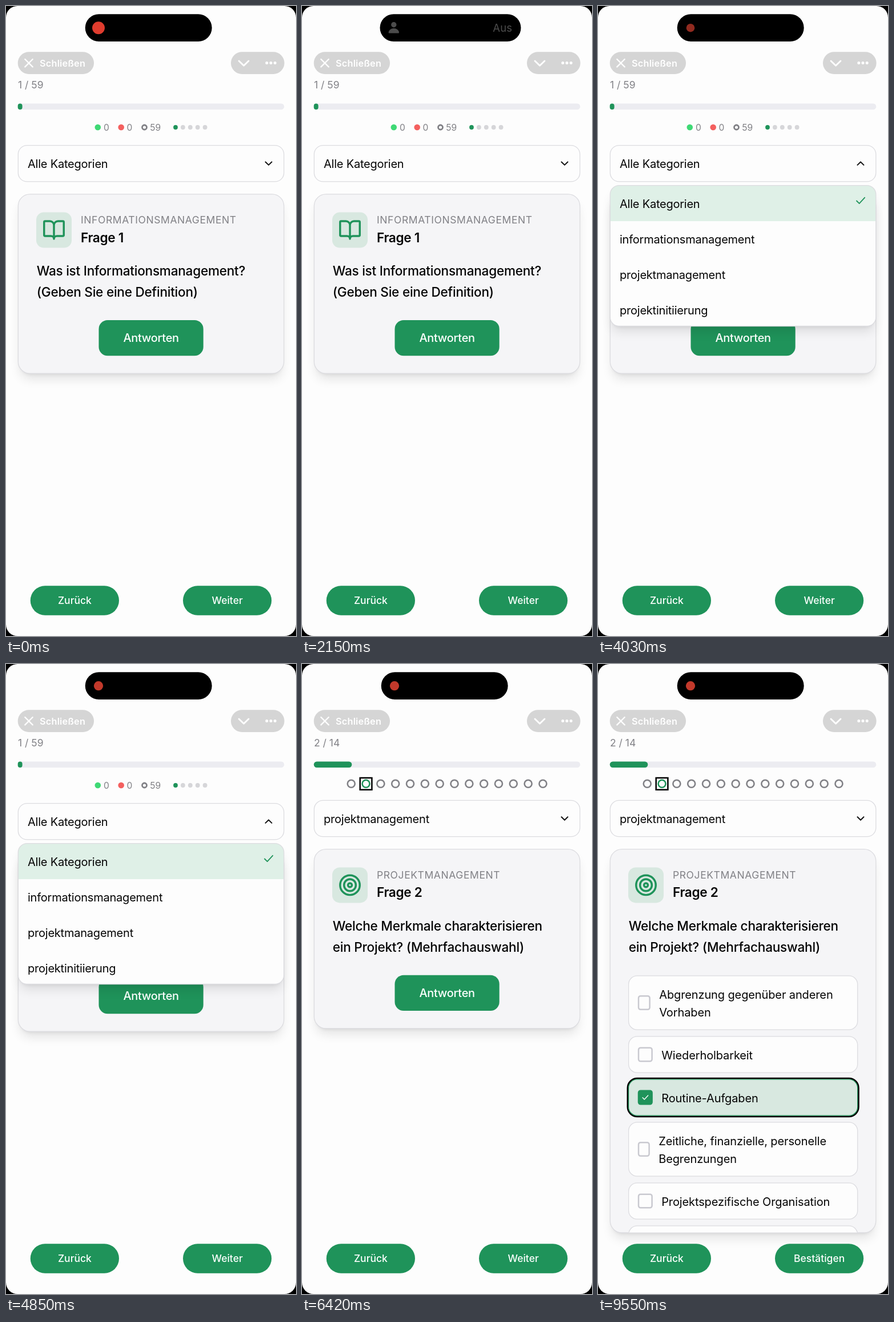
An HTML page with a canvas for the animation above (10 s loop, 508 px wide and 1101 px high).

```html
<!DOCTYPE html>
<html lang="de">
<head>
<meta charset="utf-8">
<title>Quiz</title>
<style>
  html, body { margin: 0; width: 100%; height: 100%; overflow: hidden; background: #000; }
  canvas { display: block; width: 508px; height: 1101px; }
</style>
</head>
<body>
<canvas id="stage"></canvas>
<script>
const W = 508, H = 1101, LOOP = 10000;
const GREEN = '#1f935a', GREY = '#818186', PAGE = '#fdfdfd', LINE = '#dcdce0', TINT = '#d8e8e0';
const OPEN = 3600, PICK = 4880, NEXT = 6120, ANSWER = 7670, SELECT = 9390;

const canvas = document.getElementById('stage');
const ctx = canvas.getContext('2d');
const dpr = window.devicePixelRatio || 1;
canvas.width = W * dpr;
canvas.height = H * dpr;

const ramp = (t, from, to) => Math.min(1, Math.max(0, (t - from) / (to - from)));
const smooth = p => p * p * (3 - 2 * p);
const easeOut = p => 1 - (1 - p) ** 3;
const mix = (a, b, p) => a + (b - a) * p;
const blend = (a, b, p) => `rgb(${a.map((v, i) => Math.round(mix(v, b[i], p)))})`;

function box(x0, y0, x1, y1, r, { fill, stroke, width = 1.3 } = {}) {
  ctx.beginPath();
  ctx.roundRect(x0, y0, x1 - x0, y1 - y0, r);
  if (fill) { ctx.fillStyle = fill; ctx.fill(); }
  if (stroke) { ctx.strokeStyle = stroke; ctx.lineWidth = width; ctx.stroke(); }
}

// Two stacked shadows with negative spread, to be covered by the panel itself
function shadow(x0, y0, x1, y1, r) {
  ctx.save();
  for (const [offset, blur, inset] of [[13, 19.4, 3.9], [5.2, 7.8, 5.2]]) {
    ctx.shadowColor = 'rgba(0,0,0,0.11)';
    ctx.shadowBlur = blur * dpr;
    ctx.shadowOffsetY = offset * dpr;
    box(x0 + inset, y0 + inset, x1 - inset, y1 - inset, r - inset, { fill: PAGE });
  }
  ctx.restore();
}

// y is the middle of the capital letters
function text(str, x, y, size, { color = '#050505', weight = 400, align = 'left', track = 0 } = {}) {
  ctx.font = `${weight} ${size}px Inter, sans-serif`;
  ctx.letterSpacing = track + 'px';
  ctx.textAlign = align;
  ctx.fillStyle = color;
  ctx.fillText(str, x, y + size * 0.364);
}

function disc(x, y, r, color) {
  ctx.beginPath();
  ctx.arc(x, y, r, 0, 7);
  ctx.fillStyle = color;
  ctx.fill();
}

function ring(x, y, r, width, color) {
  ctx.beginPath();
  ctx.arc(x, y, r, 0, 7);
  ctx.strokeStyle = color;
  ctx.lineWidth = width;
  ctx.stroke();
}

function path(d, x, y, scale, color, width) {
  ctx.save();
  ctx.translate(x, y);
  ctx.scale(scale, scale);
  ctx.strokeStyle = color;
  ctx.lineWidth = width / scale;
  ctx.lineCap = ctx.lineJoin = 'round';
  ctx.stroke(new Path2D(d));
  ctx.restore();
}

function button(label, x0, y0, x1, y1, r, size, fill = GREEN, track = 0) {
  box(x0, y0, x1, y1, r, { fill });
  text(label, (x0 + x1) / 2, (y0 + y1) / 2, size, { color: '#fbfffd', weight: 500, align: 'center', track });
}

function island(t) {
  const grow = easeOut(ramp(t, 30, 650));
  const shrink = smooth(ramp(t, 3090, 3390));
  const back = easeOut(ramp(t, 3400, 3900));
  const left = mix(mix(mix(138.7, 136.5, grow), 157, shrink), 138.7, back);
  const right = mix(mix(mix(360.7, 383.5, grow), 347.7, shrink), 360.7, back);
  box(left, 14.2, right, 62, 23.9, { fill: '#000' });

  ctx.save();
  const first = 1 - ramp(t, 30, 280);
  const later = smooth(ramp(t, 3480, 4300));
  ctx.globalAlpha = t < 2000 ? first : later;
  if (t < 2000) disc(162, 38.2, mix(6, 11, first), '#df3c2e');
  else disc(162, 38.2, mix(5, 8.1, later), '#c2392b');

  ctx.globalAlpha = smooth(ramp(t, 250, 600)) * (1 - ramp(t, 3090, 3300));
  disc(left + 24.3, 32.8, 4.7, '#4c4c4c');
  ctx.beginPath();
  ctx.ellipse(left + 24.3, 46.5, 9.2, 7.6, 0, Math.PI, 0);
  ctx.roundRect(left + 15.1, 45.6, 18.4, 2, 1);
  ctx.fill();
  text('Aus', right - 15.5, 38.3, 18.6, { color: '#4c4c4c', align: 'right' });
  ctx.restore();
}

function header(t) {
  island(t);
  box(20.7, 80.3, 154, 119, 19.3, { fill: '#d5d5d5' });
  box(394, 80.3, 487.6, 119, 19.3, { fill: '#d5d5d5' });
  path('M-6.7-6.7 6.7 6.7M6.7-6.7-6.7 6.7', 40, 99.7, 1, '#fff', 2.3);
  text('Schließen', 59, 99.8, 16.3, { color: '#fff', weight: 600, track: 0.2 });
  path('M-8.5-4 0 4.3 8.5-4', 416.5, 100, 1, '#fff', 2.8);
  for (const x of [456.8, 464, 471.2]) disc(x, 99.6, 2.5, '#fff');
}

function progress(t) {
  const unit = 466.6 / 14;
  const first = mix(466.6 / 59, unit, smooth(ramp(t, PICK, PICK + 300)));
  const width = mix(first, unit * 2, smooth(ramp(t, NEXT, NEXT + 300)));
  const count = t < PICK ? '1 / 59' : t < NEXT ? '1 / 14' : '2 / 14';
  text(count, 21, 137.3, 17.5, { color: GREY });
  box(20.7, 170.5, 487.3, 180.9, 5.2, { fill: '#ececf1' });
  box(20.7, 170.5, 20.7 + width, 180.9, Math.min(5.2, width / 2), { fill: GREEN });
}

function stats() {
  const style = { color: GREY };
  disc(160.8, 212, 5.3, '#3fd975');
  text('0', 171, 212, 15.6, style);
  disc(201.7, 212, 5.3, '#f4605f');
  text('0', 211.5, 212, 15.6, style);
  ring(242.5, 212, 4, 2.8, GREY);
  text('59', 252.3, 212, 15.6, style);
  for (let i = 0; i < 5; i++) disc(297 + 12.9 * i, 212, 3.9, i ? '#d6d6d9' : GREEN);
}

function steps(current) {
  for (let i = 0; i < 14; i++) {
    ring(86.2 + 25.83 * i, 209.3, 6.5, 2.6, i === current ? GREEN : GREY);
  }
  if (current === 1) box(101.7, 199, 122.4, 219.7, 0, { stroke: '#000', width: 2.5 });
}

function select(label, y, open) {
  box(21.3, y, 486.8, y + 63.3, 15.5, { fill: PAGE, stroke: LINE });
  text(label, 38, y + 32.3, 20, { track: -0.22 });
  path(open ? 'M-5.5 2.7 0-2.7 5.5 2.7' : 'M-5.5-2.7 0 2.7 5.5-2.7', 460, y + 31.6, 1, '#111', 2);
}

function dropdown() {
  const area = [21.3, 313.7, 486.8, 559.5];
  shadow(...area, 15.5);
  box(...area, 15.5, { fill: PAGE });
  box(21.3, 313.7, 486.8, 376, [15.5, 15.5, 0, 0], { fill: '#dff0e7' });
  box(...area, 15.5, { stroke: LINE });
  ['Alle Kategorien', 'informationsmanagement', 'projektmanagement', 'projektinitiierung']
    .forEach((label, i) => text(label, 38, 345.8 + 62 * i, 20, { track: -0.22 }));
  path('M-7 .5-2.3 5.2 7.2-5.2', 460, 340, 1, GREEN, 1.8);
}

function card(y, bottom, topic, title, lines, target) {
  shadow(21.3, y, 486.8, bottom, 20.7);
  box(21.3, y, 486.8, bottom, 20.7, { fill: '#f5f5f7', stroke: LINE });
  box(53, y + 31.8, 115, y + 93.8, 13, { fill: TINT });
  const scale = 1.724, cx = 84, cy = y + 62.8;
  if (target) {
    for (const r of [10, 6, 2]) ring(cx, cy, r * scale, 2 * scale, GREEN);
  } else {
    path('M12 7v14M3 18a1 1 0 0 1-1-1V4a1 1 0 0 1 1-1h5a4 4 0 0 1 4 4 4 4 0 0 1 4-4h5' +
      'a1 1 0 0 1 1 1v13a1 1 0 0 1-1 1h-6a3 3 0 0 0-3 3 3 3 0 0 0-3-3z',
      cx - 12 * scale, cy - 12 * scale, scale, GREEN, 2 * scale);
  }
  text(topic, 131, y + 45, 17.5, { color: GREY, track: 0.58 });
  text(title, 131, y + 75.6, 22.6, { weight: 600, track: -0.34 });
  lines.forEach((line, i) => text(line, 53.7, y + 133.9 + 37.5 * i, 22.6, { weight: 500, track: -0.25 }));
}

const routine = { lines: ['Routine-Aufgaben'], check: 26 };
const limits = { lines: ['Zeitliche, finanzielle, personelle', 'Begrenzungen'], check: 21 };
const unlimited = { lines: ['Unbegrenzte Ressourcen'], check: 26 };
const scope = { lines: ['Abgrenzung gegenüber anderen', 'Vorhaben'], check: 22 };
const repeat = { lines: ['Wiederholbarkeit'], check: 26 };
const team = { lines: ['Projektspezifische Organisation'], check: 26 };

function option(item, y, chosen, p) {
  const height = item.lines.length > 1 ? 94.4 : 63.4;
  const mid = y + height / 2;
  if (chosen) box(51.9, y - 1.7, 456.4, y + height + 1.7, 16.8, { stroke: '#000', width: 2.7 });
  box(53.6, y, 454.7, y + height, 15, {
    fill: chosen ? blend([253, 253, 253], [216, 232, 224], p) : PAGE,
    stroke: chosen ? blend([220, 220, 224], [31, 147, 90], p) : LINE
  });
  const x = 71, r = item.check - 2.4;
  box(x, mid - 11.8, x + r, mid + 11.8, 3.5, {
    fill: chosen ? blend([253, 253, 253], [31, 147, 90], p) : PAGE,
    stroke: chosen ? blend([200, 200, 207], [31, 147, 90], p) : '#c9c9d0',
    width: 2.5
  });
  if (chosen) path('M-4.7.3-1.6 3.4 4.9-3.4', 82.8, mid, 1, '#fff', 1.4);
  item.lines.forEach((line, i) =>
    text(line, 69.8 + item.check + 15.4, y + 32.5 + 31 * i, 20, { track: -0.12 }));
}

function options(t) {
  const shuffled = t >= SELECT;
  const list = shuffled
    ? [scope, repeat, routine, limits, team, unlimited]
    : [routine, limits, unlimited, scope, repeat, team];
  ctx.save();
  ctx.beginPath();
  ctx.roundRect(22, 324, 464.2, 669.6, 20);
  ctx.clip();
  let y = 544.8;
  for (const item of list) {
    option(item, y, shuffled && item === routine, smooth(ramp(t, SELECT - 30, SELECT + 160)));
    y += item.lines.length > 1 ? 106 : 75;
  }
  ctx.restore();
}

function draw(t) {
  ctx.setTransform(dpr, 0, 0, dpr, 0, 0);
  ctx.fillStyle = '#000';
  ctx.fillRect(0, 0, W, H);
  box(0, 0, W, H, 20, { fill: PAGE });
  header(t);
  progress(t);

  if (t < PICK) {
    const open = t >= OPEN;
    stats();
    card(328.8, 642.2, 'INFORMATIONSMANAGEMENT', 'Frage 1',
      ['Was ist Informationsmanagement?', '(Geben Sie eine Definition)'], false);
    button('Antworten', 162.5, 549, 345.7, 611.2, 15.5, 20, GREEN, -0.3);
    select('Alle Kategorien', 243.6, open);
    if (open) dropdown();
  } else {
    const second = t >= NEXT, answering = t >= ANSWER;
    steps(second ? 1 : 0);
    select('projektmanagement', 238.4, false);
    card(323.6, answering ? 994 : 637, 'PROJEKTMANAGEMENT', second ? 'Frage 2' : 'Frage 1',
      second ? ['Welche Merkmale charakterisieren', 'ein Projekt? (Mehrfachauswahl)']
             : ['Was ist ein Projekt? (Geben Sie', 'eine Definition)'], true);
    if (answering) options(t);
    else button('Antworten', 162.5, 543.8, 345.7, 606, 15.5, 20, GREEN, -0.3);
  }

  button('Zurück', 42.7, 1013.2, 198, 1064.7, 25.7, 17.5);
  if (t < ANSWER) button('Weiter', 310, 1013.2, 465.2, 1064.7, 25.7, 17.5);
  else button('Bestätigen', 310, 1013.2, 465.2, 1064.7, 25.7, 17.5,
    blend([130, 129, 136], [31, 147, 90], smooth(ramp(t, SELECT - 30, SELECT + 160))));
}

const start = performance.now();
function frame() {
  draw((performance.now() - start) % LOOP);
  requestAnimationFrame(frame);
}
frame();
</script>
</body>
</html>
```
